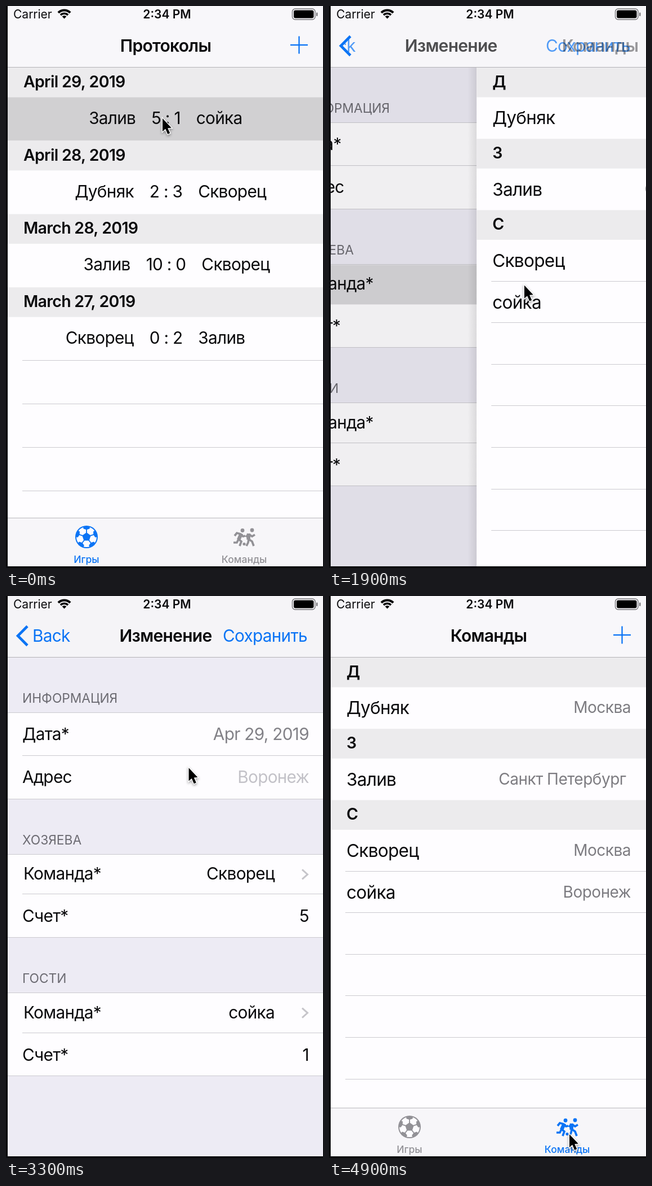
An HTML page with a canvas for the animation above (5 s loop, 563 by 995 pixels).

```html
<!DOCTYPE html>
<html lang="ru">
<head>
<meta charset="utf-8">
<style>
  html, body { margin: 0; width: 100%; height: 100%; overflow: hidden; background: #0d0d10; }
  canvas { display: block; }
</style>
</head>
<body>
<canvas id="stage" width="563" height="995"></canvas>
<script>
const ctx = document.getElementById('stage').getContext('2d');
const LOOP = 5000, STEP = 100, LEFT = 3, WIDTH = 560, TOP = 109, BOTTOM = 992;
const BLUE = '#0b74f5', BLACK = '#0a0a0c', GRAY = '#7d7c81', LINE = '#cbcacf';
const BODY = 29.75;
const TEAM = { z: 'Залив', s: 'Скворец', d: 'Дубняк', t: 'сойка' };

// ---- helpers ----
function setFont(size, weight) {
  ctx.font = `${weight} ${size}px Inter, "Liberation Sans", sans-serif`;
  ctx.letterSpacing = size > 28 ? '-0.7px' : size > 25 ? '-0.5px' : '0px';
}
function text(str, x, y, { size = BODY, color = BLACK, align = 'left', weight = 400 } = {}) {
  setFont(size, weight);
  ctx.fillStyle = color;
  ctx.textAlign = align;
  ctx.fillText(str, x, y);
}
function rect(x, y, w, h, color) {
  ctx.fillStyle = color;
  ctx.fillRect(x, y, w, h);
}
function rule(x, y, color = LINE) {
  rect(x, Math.floor(y), LEFT + WIDTH - x, 1, color);
}
function stroke(points, width, color) {
  ctx.beginPath();
  points.forEach(([x, y]) => ctx.lineTo(x, y));
  ctx.lineWidth = width;
  ctx.strokeStyle = color;
  ctx.stroke();
}
function disc(x, y, r, color) {
  ctx.beginPath();
  ctx.arc(x, y, r, 0, Math.PI * 2);
  ctx.fillStyle = color;
  ctx.fill();
}
function faded(alpha, dx, draw) {
  ctx.save();
  ctx.globalAlpha = Math.max(0, Math.min(1, alpha));
  ctx.translate(dx, 0);
  draw();
  ctx.restore();
}

// ---- icons ----
function ball(cx, cy, color) {
  const at = (r, a) => [cx + r * Math.cos(a), cy + r * Math.sin(a)];
  const fill = points => {
    ctx.beginPath();
    points.forEach(([x, y]) => ctx.lineTo(x, y));
    ctx.fillStyle = color;
    ctx.fill();
  };
  disc(cx, cy, 20, color);
  disc(cx, cy, 18, '#fdfcff');
  const angles = [0, 1, 2, 3, 4].map(i => -Math.PI / 2 + i * Math.PI * 0.4);
  fill(angles.map(a => at(8, a)));
  for (const a of angles) {
    stroke([at(7, a), at(14, a)], 1.8, color);
    fill([at(12.8, a), at(15.5, a + 0.36), at(19.5, a + 0.32), at(19.5, a - 0.32), at(15.5, a - 0.36)]);
  }
}
function runners(color) {
  disc(420, 928.5, 3.4, color);
  disc(437, 928, 3.4, color);
  disc(423, 952.5, 2.6, color);
  stroke([[418, 934], [413, 945]], 6.5, color);
  stroke([[431, 934], [430.5, 945]], 6.5, color);
  [
    [[417, 935], [410, 933], [406, 938]],
    [[417, 935], [421, 939], [425, 938]],
    [[413, 944], [418, 948], [415, 956]],
    [[413, 944], [410, 950], [404, 950]],
    [[431, 935], [426, 940]],
    [[431, 935], [437, 939], [442, 936]],
    [[431, 944], [437, 948], [440, 956]],
    [[431, 944], [430, 950], [427, 956]]
  ].forEach(limb => stroke(limb, 3.7, color));
}
function disclosure(y) {
  stroke([[526, y - 8.5], [535.5, y], [526, y + 8.5]], 3, '#c6c5ca');
}
function cursor(x, y) {
  ctx.save();
  ctx.translate(x, y);
  ctx.scale(0.93, 0.93);
  ctx.beginPath();
  [[0, 0], [0, 25], [5.6, 20], [10, 30], [14.2, 28], [9.9, 18.5], [17, 18]]
    .forEach(([px, py]) => ctx.lineTo(px, py));
  ctx.closePath();
  ctx.shadowColor = 'rgba(0,0,0,.4)';
  ctx.shadowBlur = 4;
  ctx.shadowOffsetY = 2;
  ctx.lineWidth = 3;
  ctx.strokeStyle = '#fff';
  ctx.stroke();
  ctx.shadowColor = 'transparent';
  ctx.fillStyle = '#000';
  ctx.fill();
  ctx.restore();
}

// ---- pages, in resting coordinates ----
function pageBase(color) {
  rect(LEFT, TOP, WIDTH, BOTTOM - TOP, color);
}
function band(label, y) {
  rect(LEFT, y, WIDTH, 52.5, '#ecebed');
  text(label, 31, y + 35, { size: 28.5, weight: 600 });
}
function tabBar(active) {
  const tint = i => i === active ? BLUE : '#929196';
  rect(LEFT, 906, WIDTH, BOTTOM - 906, '#f7f6f9');
  rule(LEFT, 906, '#b9b8bc');
  ball(143, 940, tint(0));
  runners(tint(1));
  ['Игры', 'Команды'].forEach((name, i) =>
    text(name, 143 + i * 280, 986, { size: 17.5, weight: 500, align: 'center', color: tint(i) }));
}
function gamesPage(t) {
  const games = [
    ['April 29, 2019', t < 3800 ? TEAM.z : TEAM.s, '5 : 1', TEAM.t],
    ['April 28, 2019', TEAM.d, '2 : 3', TEAM.s],
    ['March 28, 2019', TEAM.z, '10 : 0', TEAM.s],
    ['March 27, 2019', TEAM.s, '0 : 2', TEAM.z]
  ];
  pageBase('#fefdff');
  games.forEach(([date, home, score, away], i) => {
    const y = TOP + i * 129.7;
    band(date, y);
    if (i === 0 && t < 1800) rect(LEFT, y + 52.5, WIDTH, 77, '#d1d0d2');
    setFont(BODY, 400);
    const gap = ctx.measureText(score).width / 2 + 28;
    text(home, 284 - gap, y + 100, { align: 'right' });
    text(score, 284, y + 100, { align: 'center' });
    text(away, 284 + gap, y + 100);
  });
  for (let i = 0; i < 4; i++) rule(29, 627 + i * 77);
  tabBar(0);
}
function formPage(t) {
  pageBase('#edebf4');
  const block = (label, y, split, end) => {
    text(label, 29, y - 17.5, { size: 22.75, color: '#6c6b72' });
    rect(LEFT, y, WIDTH, end - y, '#fefdff');
    rule(LEFT, y);
    rule(29, split);
    rule(LEFT, end);
  };
  const right = (str, y, color = BLACK, x = 538) => text(str, x, y, { align: 'right', color });

  block('ИНФОРМАЦИЯ', 206.6, 282.6, 359);
  text('Дата*', 29, 255);
  right('Apr 29, 2019', 255, '#828187');
  text('Адрес', 29, 331);
  right('Воронеж', 330.5, '#c3c2c8');

  const side = (label, y, team, score, lit) => {
    block(label, y, y + 70.5, y + 147);
    if (lit) rect(LEFT, y + 1, WIDTH, 70, '#d9d8db');
    text('Команда*', 31, y + 45);
    right(team, y + 45, BLACK, 477);
    disclosure(y + 35.5);
    text('Счет*', 29, y + 120);
    right(score, y + 120);
  };
  side('ХОЗЯЕВА', 457.4, t < 2600 ? TEAM.z : TEAM.s, '5', t >= 1800 && t < 2500);
  side('ГОСТИ', 702.6, TEAM.t, '1', false);
}
function teamsPage(t, tabbed) {
  const row = (y, name, city, x = 536) => {
    text(name, 31, y + 48, { size: 31.5 });
    text(city, x, y + 46, { size: 28, color: GRAY, align: 'right' });
  };
  pageBase('#fefdff');
  band('Д', TOP);
  band('З', TOP + 126.2);
  band('С', TOP + 252.4);
  if (!tabbed && t >= 2600) rect(LEFT, 413.9, WIDTH, 73.3, '#d9d9db');
  row(161.3, TEAM.d, 'Москва');
  row(287.5, TEAM.z, 'Санкт Петербург', 527.5);
  row(413.8, TEAM.s, 'Москва');
  row(487.5, TEAM.t, 'Воронеж');
  for (let i = 0; i < 7; i++) rule(29, 487 + i * 73.6);
  if (tabbed) tabBar(1);
}

function plus() {
  stroke([[505, 69], [536, 69]], 2.3, BLUE);
  stroke([[520.5, 53.5], [520.5, 84.5]], 2.3, BLUE);
}
const games = { title: 'Протоколы', bar: '#f8f7fa', page: gamesPage, button: plus };
const form = {
  title: 'Изменение', bar: '#f5f4f7', page: formPage, chevron: true, back: 'Back',
  button: () => text('Сохранить', 535, 81, { color: BLUE, align: 'right' })
};
const picker = { title: 'Команды', bar: '#f8f7fa', page: t => teamsPage(t, false), chevron: true };
const teams = { title: 'Команды', bar: '#f8f7fa', page: t => teamsPage(t, true), button: plus };

// ---- navigation ----
// Distance still to travel on a critically damped spring.
function rest(ms, speed, snap) {
  if (ms <= 0) return 1;
  const x = ms * speed, r = (1 + x) * Math.exp(-x);
  return r < snap ? 0 : r;
}
// Lower screen, upper screen, elapsed transition time, whether it is a push.
function route(t) {
  if (t < 100) return [games, form, 0, true];
  if (t < 600) return [games, form, 18.5, true];
  if (t < 1800) return [games, form, 1000, true];
  if (t < 2600) return [form, picker, t - 1810, true];
  if (t < 3800) return [form, picker, t - 2730, false];
  if (t < 4800) return [games, form, t - 3836, false];
  return [teams, form, 0, true];
}
function drawPages(lower, upper, q, t) {
  const edge = LEFT + WIDTH * (1 - q);
  if (q < 1) {
    faded(1, -168 * q, () => lower.page(t));
    if (q > 0) {
      rect(LEFT, TOP, WIDTH, BOTTOM - TOP, `rgba(0,0,0,${0.1 * q})`);
      const shade = ctx.createLinearGradient(edge - 16, 0, edge, 0);
      shade.addColorStop(0, 'rgba(0,0,0,0)');
      shade.addColorStop(1, 'rgba(0,0,0,.09)');
      rect(edge - 16, TOP, 16, BOTTOM - TOP, shade);
    }
  }
  if (q > 0) faded(1, edge - LEFT, () => upper.page(t));
}
function drawBar(lower, upper, n) {
  rect(LEFT, 0, WIDTH, TOP, lower.bar);
  faded(n, 0, () => rect(LEFT, 0, WIDTH, TOP, upper.bar));
  rule(LEFT, TOP - 1, '#b4b3b7');

  const part = (screen, alpha, titleDx, backDx, buttonAlpha) => {
    if (alpha <= 0) return;
    faded(alpha, titleDx, () =>
      text(screen.title, 283.5, 80.5, { size: 30, weight: 600, align: 'center' }));
    if (screen.back) {
      ctx.save();
      ctx.beginPath();
      ctx.rect(28, 40, 535, 60);
      ctx.clip();
      faded(alpha, backDx, () => text(screen.back, 47, 81, { color: BLUE }));
      ctx.restore();
    }
    if (screen.button) faded(buttonAlpha, 0, screen.button);
  };
  const lowerAlpha = 1 - n ** 1.5, upperAlpha = n * n * (3 - 2 * n);
  part(lower, lowerAlpha, -154 * n, -154 * n, lowerAlpha);
  part(upper, upperAlpha, 350 * (1 - n), 155 * (1 - n), n ** 4);

  const chevron = lower.chevron ? 1 : n;
  faded(chevron, 0, () => stroke([[38, 53.5], [21, 70.5], [38, 87.5]], 4.6, BLUE));
}
function drawStatus() {
  text('Carrier', 13, 22, { size: 21 });
  text('2:34 PM', 286, 22, { size: 21, weight: 600, align: 'center' });

  const fan = (inner, outer) => {
    const a = -Math.PI * 0.75, b = -Math.PI * 0.25;
    ctx.beginPath();
    ctx.arc(103.5, 22.5, outer, a, b);
    ctx.arc(103.5, 22.5, inner, b, a, true);
    ctx.fillStyle = '#000';
    ctx.fill();
  };
  fan(0, 5.5);
  fan(7.5, 11);
  fan(13, 17);

  ctx.beginPath();
  ctx.roundRect(508.5, 5, 40.5, 19, 5);
  ctx.lineWidth = 1.4;
  ctx.strokeStyle = '#77767a';
  ctx.stroke();
  ctx.beginPath();
  ctx.roundRect(511, 7.5, 35.5, 14, 3);
  ctx.fillStyle = '#000';
  ctx.fill();
  ctx.beginPath();
  ctx.roundRect(551, 11.5, 2.4, 6.5, 1.2);
  ctx.fillStyle = '#77767a';
  ctx.fill();
}

// ---- pointer path: time, x, y ----
const path = [
  [0, 278, 199], [500, 278, 199], [600, 382, 307], [1000, 378, 330], [1500, 346, 512],
  [1700, 349, 496], [2200, 343, 492], [2600, 320, 448], [2900, 267, 442],
  [3100, 270, 430], [3600, 425, 73], [3900, 418, 73], [4200, 418, 90],
  [4700, 427, 950], [4900, 427, 953]
];
function pointer(t) {
  const i = path.findIndex(p => p[0] > t);
  if (i < 0) return path[path.length - 1].slice(1);
  const a = path[i - 1], b = path[i];
  const u = (t - a[0]) / (b[0] - a[0]), s = u * u * (3 - 2 * u);
  return [a[1] + (b[1] - a[1]) * s, a[2] + (b[2] - a[2]) * s];
}

function draw(t) {
  const [lower, upper, ms, push] = route(t);
  const shown = r => push ? 1 - r : r;
  rect(0, 0, 563, 995, '#0d0d10');
  ctx.save();
  ctx.beginPath();
  ctx.rect(LEFT, 0, WIDTH, BOTTOM);
  ctx.clip();
  drawPages(lower, upper, shown(rest(ms, 0.02, 0.002)), t);
  drawBar(lower, upper, shown(rest(ms, 0.0164, 0.015)));
  drawStatus();
  ctx.restore();
  cursor(...pointer(t));
}
function tick() {
  draw(Math.floor(performance.now() % LOOP / STEP) * STEP);
  requestAnimationFrame(tick);
}
tick();
</script>
</body>
</html>
```
